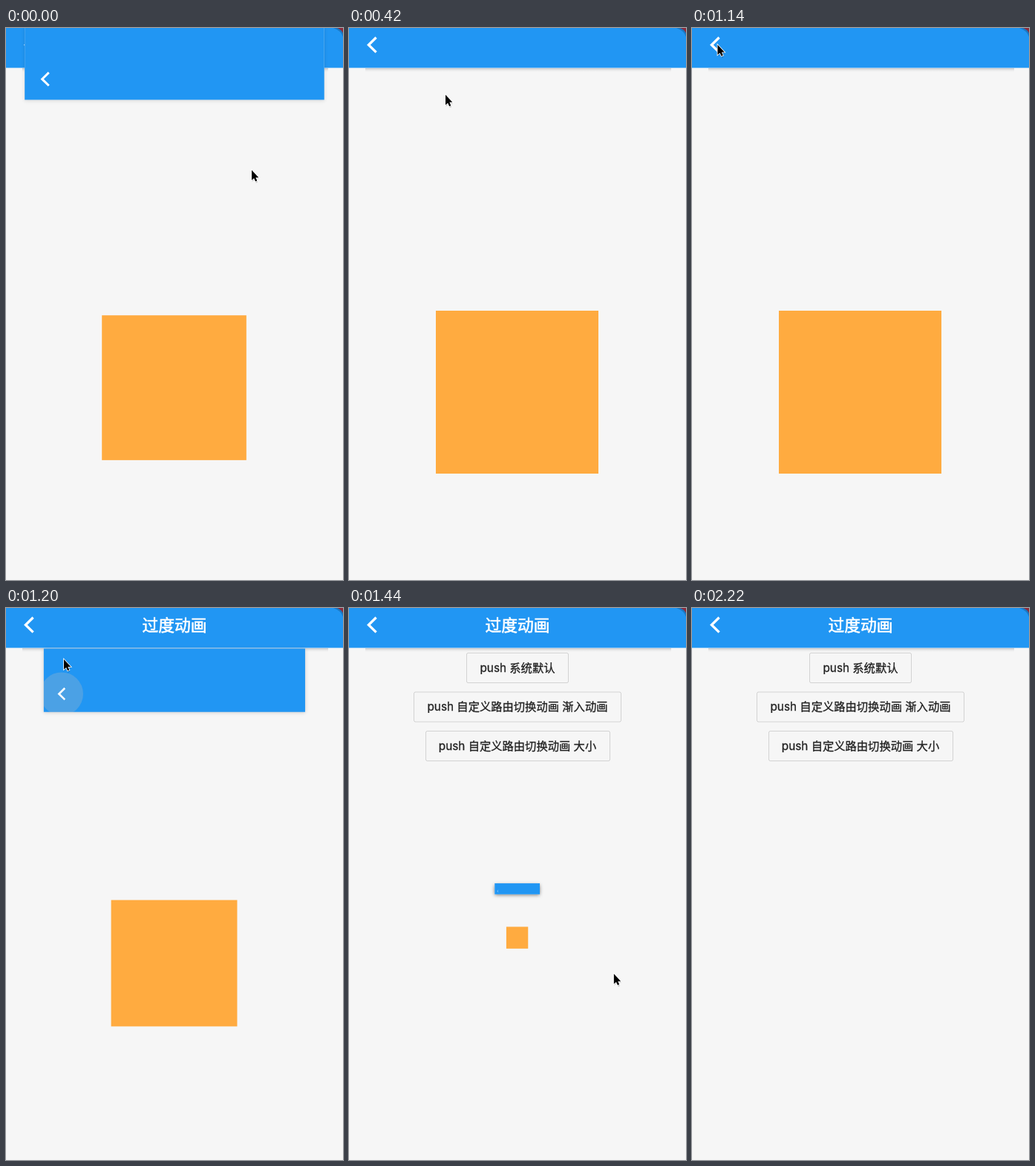
An HTML page for the animation above (2.28 s loop, 454 px wide and 742 px high).

```html
<!DOCTYPE html>
<html lang="zh-CN">
<head>
<meta charset="utf-8">
<title>过度动画</title>
<style>
  html, body { margin: 0; width: 100%; height: 100%; overflow: hidden; background: #f6f6f6; }
  #stage { position: relative; width: 454px; height: 742px; overflow: hidden; background: #f6f6f6; }
  #stage > *, .page > * { position: absolute; }
  svg { left: 0; top: 0; overflow: visible; }
  text { font-family: Inter, "Noto Sans CJK SC", "Noto Sans CJK", sans-serif; text-anchor: middle; }
  .bar { left: 0; width: 454px; background: #2196f3; }
  #home, .open .bar { background: linear-gradient(#2196f3 calc(100% - 1px), #7fc0f5 0); }
  #home::after, .open .bar::after {
    content: ""; position: absolute; left: 22px; right: 20px; top: 100%; height: 5px;
    background: linear-gradient(rgba(0,0,0,.18), rgba(0,0,0,.06) 50%, transparent);
  }
  #home { top: 0; height: 54px; }
  .page {
    left: 0; top: -56px; width: 454px; height: 983px;
    background: #f6f6f6; transform-origin: 226.6px 492px;
  }
  .page .bar { top: 0; height: 110px; }
  .page .clip { left: 0; top: 0; width: 454px; height: 110px; overflow: hidden; }
  .box { left: 117.2px; top: 436.4px; width: 219px; height: 219px; background: #ffab40; }
  .button rect { fill: none; stroke: rgba(0,0,0,.14); }
  .button text { font-size: 15.3px; fill: #212121; stroke: #212121; stroke-width: .3; }
  .title { font-size: 21.8px; fill: #fff; stroke: #fff; stroke-width: .6; }
  .back { fill: none; stroke: #fff; stroke-width: 3.3; }
</style>
</head>
<body>
<div id="stage">
  <div class="bar" id="home"></div>
  <svg width="454" height="742">
    <path class="back" d="M36.6 12.8 26.4 22.7 36.6 32.6"/>
    <text class="title" x="227" y="31.2">过度动画</text>
    <g id="buttons"></g>
  </svg>

  <div class="page" id="page">
    <div class="bar" id="pageBar"></div>
    <div class="clip">
      <svg width="454" height="110">
        <g transform="translate(0 56)">
          <circle id="ripple" cx="31" cy="22.7" r="37.5" fill="#bcbcbc"/>
          <path class="back" d="M36.6 12.8 26.4 22.7 36.6 32.6"/>
        </g>
      </svg>
    </div>
    <div class="box"></div>
  </div>

  <svg width="454" height="742">
    <path d="M441 0H454V12Q451 3 441 0Z" opacity=".2"/>
    <path d="M446 0H454V7Q452 2 446 0Z" fill="#8c2b3c"/>
    <g id="cursor">
      <path d="M0 0V14L3.1 11.2 5.2 15.8 7.6 14.7 5.6 10.2H9.6Z" opacity=".18" transform="translate(.6 1.6)"/>
      <path d="M0 0V13.6L3.1 10.9 5.1 15.3 7.3 14.3 5.4 10H9.3Z" stroke="#fff" stroke-width="1.6" paint-order="stroke"/>
    </g>
  </svg>
</div>
<script>
  const LOOP = 2280, STEP = 60, GROW = 800, BACK = 1200;
  const $ = id => document.getElementById(id);
  const clamp = v => Math.min(1, Math.max(0, v));
  const smooth = u => u * u * (3 - 2 * u);

  // each outline fits its label
  const labels = ['push 系统默认', 'push 自定义路由切换动画 渐入动画', 'push 自定义路由切换动画 大小'];
  $('buttons').innerHTML = labels.map((label, i) => `<g class="button" transform="translate(227 ${60.5 + 52.5 * i})">
    <rect height="40" rx="2"/><text y="25.3">${label}</text></g>`).join('');
  document.querySelectorAll('.button').forEach(b => {
    const w = Math.round(b.lastChild.getComputedTextLength() + 36);
    b.querySelector('rect').setAttribute('width', w);
    b.querySelector('rect').setAttribute('x', Math.floor(-w / 2) + 0.5);
  });

  // cubic-bezier(.4, 0, .2, 1)
  function ease(x) {
    if (x >= 1) return 1;
    let lo = 0, hi = 1;
    for (let i = 0; i < 30; i++) {
      const u = (lo + hi) / 2, v = 1 - u;
      if (1.2 * v * v * u + 0.6 * v * u * u + u * u * u < x) lo = u; else hi = u;
    }
    return smooth(lo);
  }

  const pageScale = t => ease(t < BACK ? 0.617 + t / GROW : 0.5 - (t - BACK) / GROW);

  const curve = (a, b, c, k) =>
    a.map((_, i) => (1 - k) ** 2 * a[i] + 2 * k * (1 - k) * b[i] + k * k * c[i]);

  // glide to the back arrow, then dart away and slow down
  function cursorAt(t) {
    return t < BACK
      ? curve([331, 191], [158, 121], [34.5, 22.5], smooth(clamp(t / 707)))
      : curve([78, 69], [381, 368], [418, 765], 1 - Math.exp((BACK - t) / 235));
  }

  function draw(ms) {
    const t = Math.floor((ms % LOOP) / STEP) * STEP;
    const s = pageScale(t), page = $('page');
    page.style.transform = `scale(${s})`;
    page.style.visibility = s > 0.001 ? 'visible' : 'hidden';
    page.classList.toggle('open', s === 1);
    $('pageBar').style.boxShadow = s > 0.001 && s < 1
      ? `0 ${1.5 / s}px ${5 / s}px rgba(0,0,0,${0.05 + 0.6 * (1 - s)})` : 'none';
    $('ripple').setAttribute('opacity', t < BACK ? 0 : 0.27 * clamp(1 - (t - BACK) / 140));
    $('cursor').setAttribute('transform', `translate(${cursorAt(t)})`);
  }

  const start = performance.now();
  function tick() {
    draw(Math.max(0, performance.now() - start));
    requestAnimationFrame(tick);
  }
  tick();
</script>
</body>
</html>
```
